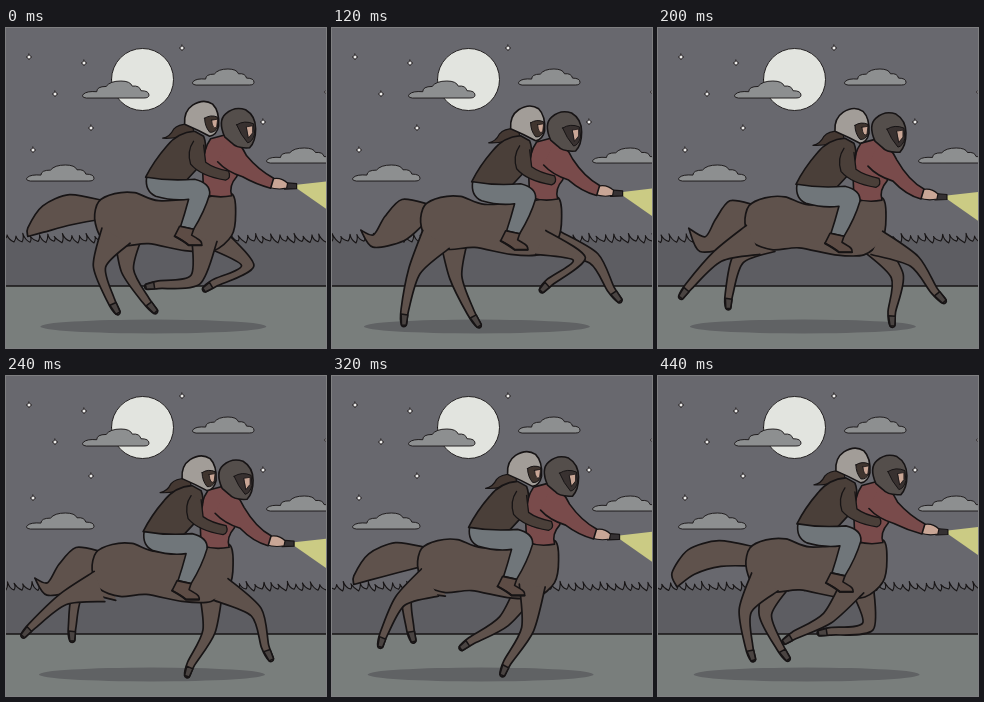
These frames come from a looping animation (320 by 320 pixels, 0.48 s). An HTML page with a canvas:

```html
<!DOCTYPE html>
<html lang="en">
<head>
<meta charset="utf-8">
<title>Night gallop</title>
<style>
html, body { margin: 0; width: 100%; height: 100%; overflow: hidden; background: #68686e; }
canvas { display: block; width: 320px; height: 320px; }
</style>
</head>
<body>
<canvas id="stage"></canvas>
<script>
const canvas = document.getElementById('stage');
const ctx = canvas.getContext('2d');
const ratio = window.devicePixelRatio || 1;
canvas.width = canvas.height = 320 * ratio;

const LOOP = 480, STEP = 40, POSES = 11;
const INK = '#171415', COAT = '#5f524c', HOOF = '#4a4442', SKIN = '#c9a696';
const SWEATER = '#794b4b', JACKET = '#4a3f39';

// Closed paths of a hoof through one stride, evenly spaced in time.
const FORE = [[198, 262], [282, 271], [277, 277], [229, 299], [157, 297], [130, 274], [126, 266], [150, 257]];
const HIND = [[112, 285], [102, 298], [34, 291], [22, 268], [18, 259], [46, 270], [66, 279], [88, 284]];

// A raised and a lowered tail; the fourth point is the tip.
const TAIL_UP = [[60, 164], [28, 172], [11, 196], [18, 212], [36, 196], [62, 188]];
const TAIL_DOWN = [[72, 173], [58, 192], [48, 209], [31, 200], [42, 224], [74, 218]];

const lerp = (a, b, k) => a + (b - a) * k;
const mix = (a, b, k) => [lerp(a[0], b[0], k), lerp(a[1], b[1], k)];
const wave = (pose, peak) => Math.cos((pose - peak) / POSES * 2 * Math.PI);
const bob = (pose, mid, size, peak) => [1.7 * wave(pose, 1) - .8, mid + size * wave(pose, peak)];

function paint(path, fill, width = 1.6) {
  if (fill) { ctx.fillStyle = fill; ctx.fill(path); }
  if (width) { ctx.lineWidth = width; ctx.strokeStyle = INK; ctx.stroke(path); }
}
const draw = (d, fill, width) => paint(new Path2D(d), fill, width);

function shifted([x, y], fn) {
  ctx.save();
  ctx.translate(x, y);
  fn();
  ctx.restore();
}

// Adds a smooth curve through the points.
function trace(path, pts, closed = false) {
  const n = pts.length;
  const at = i => pts[closed ? (i + n) % n : Math.max(0, Math.min(n - 1, i))];
  path.lineTo(...pts[0]);
  for (let i = 0; i < (closed ? n : n - 1); i++) {
    const [a, b, c, d] = [at(i - 1), at(i), at(i + 1), at(i + 2)];
    path.bezierCurveTo(b[0] + (c[0] - a[0]) / 7, b[1] + (c[1] - a[1]) / 7,
      c[0] - (d[0] - b[0]) / 7, c[1] - (d[1] - b[1]) / 7, c[0], c[1]);
  }
  return path;
}

// Place of a hoof on its closed path.
function stride(path, pose) {
  const n = path.length, u = (pose / POSES + 1) % 1 * n, i = Math.floor(u), f = u - i;
  const at = k => path[(i + k + n) % n];
  return [0, 1].map(c => {
    const [p, q, r, s] = [-1, 0, 1, 2].map(k => at(k)[c]);
    return q + f / 2 * (r - p + f * (2 * p - 5 * q + 4 * r - s + f * (3 * (q - r) + s - p)));
  });
}

// Two-bone reach from hip to toe; bones stretch a little when too short.
function knee(hip, toe, upper, lower, bend) {
  const dx = toe[0] - hip[0], dy = toe[1] - hip[1], d = Math.hypot(dx, dy);
  const k = Math.max(1, d * 1.02 / (upper + lower));
  const along = ((upper * k) ** 2 - (lower * k) ** 2 + d * d) / (2 * d);
  const out = bend * Math.sqrt(Math.max(0, (upper * k) ** 2 - along ** 2));
  return [hip[0] + (dx * along + dy * out) / d, hip[1] + (dy * along - dx * out) / d];
}

// A tapered limb, left open at the hip so it blends into the body.
function limb(root, toe, width, upper, lower, bend) {
  const hip = [lerp(root[0], toe[0], .15), root[1]];
  const joint = knee(hip, toe, upper, lower, bend);
  const ankle = mix(joint, toe, .72);
  ankle[0] -= 2;
  const bones = [hip, joint, ankle, toe], half = [width, 6.2, 3.8, 2.4];
  const left = [], right = [];
  bones.forEach(([x, y], i) => {
    const p = bones[Math.max(0, i - 1)], q = bones[Math.min(3, i + 1)];
    const len = Math.hypot(q[0] - p[0], q[1] - p[1]);
    const nx = (p[1] - q[1]) / len * half[i], ny = (q[0] - p[0]) / len * half[i];
    left.push([x + nx, y + ny]);
    right.push([x - nx, y - ny]);
  });
  paint(trace(new Path2D(), [...left, ...[...right].reverse()]), COAT, 1.7);
  const hoof = new Path2D();
  [mix(left[2], left[3], .3), left[3], right[3], mix(right[2], right[3], .3)]
    .forEach(p => hoof.lineTo(...p));
  hoof.closePath();
  paint(hoof, HOOF, 1.5);
}

function cloud(x, y, w, h) {
  const P = (a, b) => `${x + w * a} ${y + h * b} `;
  draw(`M${P(.06, 1)}Q${P(-.02, .95)}${P(.02, .78)}Q${P(.07, .58)}${P(.22, .63)}
    Q${P(.22, .32)}${P(.36, .32)}Q${P(.42, 0)}${P(.58, 0)}Q${P(.72, 0)}${P(.75, .3)}
    Q${P(.86, .25)}${P(.88, .57)}Q${P(1, .57)}${P(1, .83)}Q${P(1, 1)}${P(.93, 1)}Z`, '#8d8f90', .9);
}

function star(x, y) {
  draw(`M${x} ${y - 3} L${x + 1} ${y - 1} L${x + 3} ${y} L${x + 1} ${y + 1}
    L${x} ${y + 3} L${x - 1} ${y + 1} L${x - 3} ${y} L${x - 1} ${y - 1}Z`, '#f0f0ee', .7);
}

const STARS = [[23, 29], [78, 35], [176, 20], [49, 66], [85, 100], [27, 122], [257, 94], [321, 64]];

// Jagged hedge top, repeating every 320 px.
const hedge = new Path2D('M-10 260 L-10 214');
for (let i = 0; i < 82; i++) {
  const k = i % 40, x = i * 8, tip = 207 + 1.6 * Math.sin(k * 2.4);
  hedge.quadraticCurveTo(x + 2, 211, x + 1 + Math.sin(k * 1.7), tip);
  hedge.quadraticCurveTo(x + 3, 212, x + 8, 214 + Math.sin(k * 3.3));
}
hedge.lineTo(660, 260);

function scene(step, pose) {
  ctx.fillStyle = '#68686e';
  ctx.fillRect(0, 0, 320, 320);
  draw('M105.5 51.5 a31 31 0 1 0 62 0 a31 31 0 1 0 -62 0Z', '#e2e4df', .9);
  STARS.forEach(s => star(...s));
  cloud(76, 53, 67, 17);
  cloud(186, 41, 62, 16);
  cloud(20, 137, 68, 16);
  cloud(260, 120, 66, 15);

  shifted([-320 * step * STEP / LOOP, 0], () => paint(hedge, '#5d5d62', 1.1));
  ctx.fillStyle = '#797e7c';
  ctx.fillRect(0, 258, 320, 62);
  draw('M0 258 H320', null, 1.6);
  ctx.fillStyle = '#606264';
  ctx.beginPath();
  ctx.ellipse(147 - 2.5 * wave(pose, 3), 298.5, 113, 7, 0, 0, 7);
  ctx.fill();
}

function horse(pose) {
  const [dx, dy] = bob(pose, 2.6, 3.6, 3.2);
  const at = (x, y) => [x + dx, y + dy];
  const fore = (x, lag, width) => limb(at(x, 209), stride(FORE, pose - lag), width, 42, 50, 1);
  const hind = (x, lag, ahead, width) => {
    const [tx, ty] = stride(HIND, pose - lag);
    limb(at(x, 206), [tx + ahead, ty], width, 35, 50, -1);
  };
  hind(117, .6, 46, 14);
  fore(211, 0, 12);

  const drop = (1 + wave(pose, 3.5)) / 2;
  const t = TAIL_UP.map((p, i) => mix(p, TAIL_DOWN[i], drop));
  const tail = trace(new Path2D(), [at(97, 171), ...t.slice(0, 4)]);
  paint(trace(tail, [...t.slice(3), at(92, 190)]), COAT, 1.7);

  const body = trace(new Path2D(), [
    at(92, 172), at(108, 164), at(128, 163), at(152, 171), at(196, 168), at(225, 164),
    at(229, 184), at(225, 206), at(207, 221), at(178, 221), at(142, 214),
    at(116, 216), at(95, 208), at(88, 189)], true);
  paint(body, COAT, 1.7);
  hind(109, 0, 0, 16);
  fore(208, 1.8, 13);
}

function driver(pose) {
  const s = bob(pose, 3.2, 3, 3.6), h = bob(pose, 6.3, 6.7, 3.9);
  const S = (x, y) => `${x + s[0]} ${y + s[1]} `, H = (x, y) => `${x + h[0]} ${y + h[1]} `;
  shifted(s, () => draw(`M219 105 L204 109 Q196 120 196 140 L197 164 Q210 169 225 166
    Q222 156 230 147 Q238 130 235 116 Q229 108 219 105Z`, SWEATER));
  shifted(h, () => {
    draw('M290 154.5 L330 150 V186 L290 158Z', '#cbcb84', 0);
    draw('M278 152.5 L290 153.5 V158.5 L278 159Z', '#353133', 1.2);
    draw('M264 149 Q274 146 281 153 L280 158 Q271 160 262 157Z', SKIN, 1.2);
  });
  draw(`M${S(222, 108)}Q${S(233, 111)}${S(240, 126)}Q${H(252, 140)}${H(267, 148)}
    L${H(264, 158)}Q${H(249, 154)}${S(236, 147)}Q${S(220, 142)}${S(211, 132)}`, SWEATER);
  shifted(s, () => {
    draw(`M218 107 Q211 91 219 84 Q228 76 239 80 Q249 86 249 99 Q249 112 243 118
      Q230 119 225 113Z`, '#544e4b');
    draw('M230 95 Q238 90 247 94 L248 104 Q246 112 241 113 Q234 105 230 95Z', '#383130', 1);
    draw('M240 97 L246 96 L246 103 L242 108Z', SKIN, .8);
  });
}

function passenger(pose) {
  shifted(bob(pose, 4, 4.3, 4), () => {
    draw('M186 95 Q172 94 167 100 Q163 108 156 109 Q170 110 187 103Z', '#443832', 1.2);
    draw(`M188 102 Q171 103 160 117 Q147 132 139 148 Q156 154 178 153 L190 140
      Q203 122 197 107Z`, JACKET);
    draw(`M140 148 Q138 162 149 167 Q166 172 182 170 Q178 185 174 197 L187 200
      Q198 182 203 165 Q204 154 188 150 Q162 152 140 148Z`, '#70767a');
    draw('M173 197 L168 207 Q178 212 182 216 H195 Q196 212 190 209 L185 206 L187 200Z', '#5d4c45');
    draw('M168 207 Q177 212 182 216 H195', null, 2);
    draw('M187 112 Q180 122 184 135 Q194 147 219 151 Q225 149 222 142 Q207 139 199 133 L197 116', JACKET, 1.3);
    draw(`M178 95 Q177 82 186 76 Q197 69 206 75 Q213 82 212 97 Q210 106 203 107
      Q192 101 178 95Z`, '#a29d98');
    draw('M198 89 Q204 85 211 88 L211 98 Q208 104 203 103 Q198 97 198 89Z', '#40352f', 1);
    draw('M205 91 L211 90 L210 98 Q206 101 205 91Z', SKIN, .8);
  });
}

function render(now) {
  const step = Math.floor((now % LOOP) / STEP);
  const pose = Math.max(0, step - 1); // the first pose is held for two steps
  ctx.setTransform(ratio, 0, 0, ratio, 0, 0);
  ctx.lineJoin = ctx.lineCap = 'round';
  scene(step, pose);
  horse(pose);
  driver(pose);
  passenger(pose);
}

const start = performance.now();
function tick() {
  render(performance.now() - start);
  requestAnimationFrame(tick);
}
tick();
</script>
</body>
</html>
```
